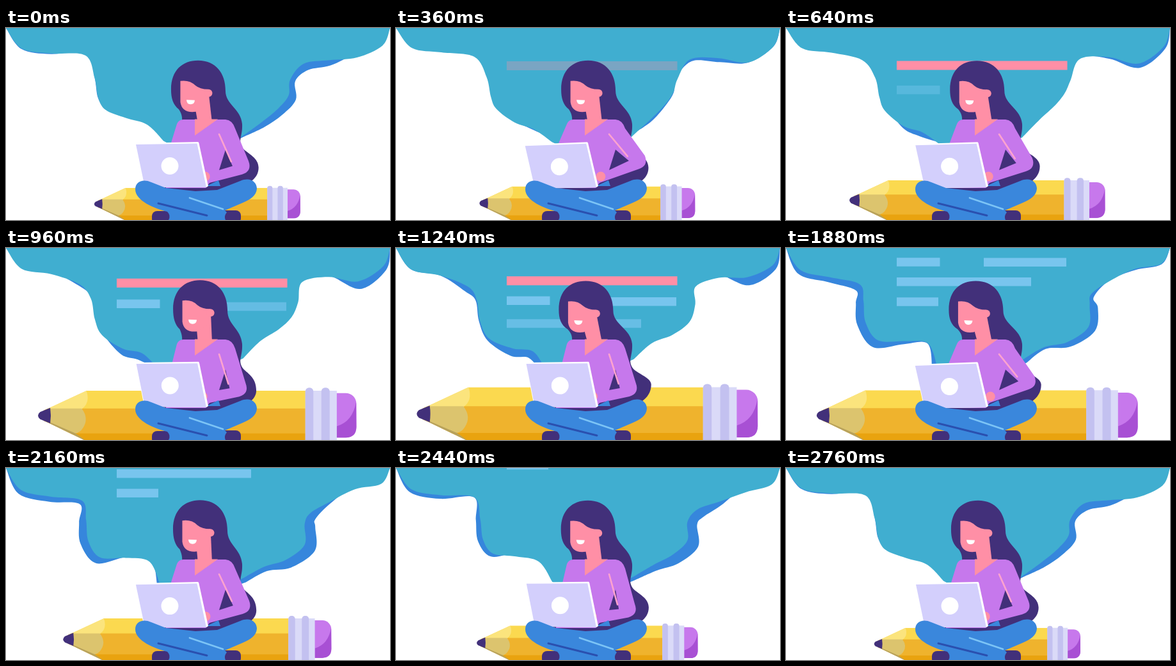
An HTML page with a canvas that plays this animation: 600x300 px, repeating every 2.8 s.

```html
<!DOCTYPE html>
<html lang="en">
<head>
<meta charset="utf-8">
<title>Writing on a pencil</title>
<style>
html, body { margin: 0; width: 100%; height: 100%; overflow: hidden; background: #fff; }
canvas { display: block; width: 600px; height: 300px; }
</style>
</head>
<body>
<canvas id="stage" width="600" height="300"></canvas>
<script>
const ctx = document.getElementById('stage').getContext('2d');
const LOOP = 2800, STEP = 40, CYCLE = LOOP - STEP;
const TEAL = '#40aed0', BLUE = '#3686dc', HAIR = '#42307a', SKIN = '#ff8fa6',
  SWEATER = '#c678ec', SKY = '#78c5ee', DENIM = '#3a87dc';

// Resting cloud edge, top to bottom: x, y, swing in px, phase in degrees.
const leftEdge = [
  [24, 33, 2, 235], [70, 42, 4, 235], [118, 52, 11, 185], [131, 80, 11, 225],
  [136, 112, 13, 228], [150, 136, 12, 215], [185, 148, 10, 140], [218, 155, 11, 115],
  [239, 182, 9, 180]
];
const rightEdge = [
  [588, 27, 3, 80], [548, 44, 12, 80], [505, 49, 4, 290], [468, 60, 15, 250],
  [458, 85, 19, 220], [453, 112, 23, 235], [430, 133, 17, 240], [400, 149, 7, 255],
  [370, 172, 3, 200]
];

const clamp = v => Math.max(0, Math.min(1, v));

// Cosine with whole turns per cycle, peaking at the given phase.
const wave = (t, phase, turns = 1) => Math.cos(2 * Math.PI * (turns * t / CYCLE - phase / 360));

function fill(color, d) {
  ctx.fillStyle = color;
  ctx.fill(new Path2D(d));
}

function line(color, width, d) {
  ctx.strokeStyle = color;
  ctx.lineWidth = width;
  ctx.lineCap = 'round';
  ctx.stroke(new Path2D(d));
}

function dot(color, x, y, r) {
  ctx.fillStyle = color;
  ctx.beginPath();
  ctx.arc(x, y, r, 0, Math.PI * 2);
  ctx.fill();
}

function box(color, x, y, w, h, r = 0) {
  ctx.fillStyle = color;
  ctx.beginPath();
  ctx.roundRect(x, y, w, h, r);
  ctx.fill();
}

// Each knot swings along its normal; the back layer follows later and further out.
function ripple(knots, corner, side, lag, t) {
  const moved = knots.map(([x, y, swing, phase], i) => {
    const a = knots[i - 1] || corner, b = knots[i + 1] || knots[i];
    const dx = b[0] - a[0], dy = b[1] - a[1], len = Math.hypot(dx, dy);
    let out = swing * wave(t, phase);
    if (lag) out += (4 + 0.4 * swing) * (0.3 + 1.2 * wave(t, phase + lag));
    return [x - side * out * dy / len, y + side * out * dx / len];
  });
  return [corner, ...moved];
}

function smooth(pts) {
  for (let i = 0; i < pts.length - 1; i++) {
    const b = pts[i], c = pts[i + 1], a = pts[i - 1] || b, d = pts[i + 2] || c;
    ctx.bezierCurveTo(b[0] + (c[0] - a[0]) / 6, b[1] + (c[1] - a[1]) / 6,
      c[0] - (d[0] - b[0]) / 6, c[1] - (d[1] - b[1]) / 6, c[0], c[1]);
  }
}

function cloud(color, t, leftLag, rightLag) {
  const right = ripple(rightEdge, [600, 0], -1, rightLag, t).reverse();
  ctx.fillStyle = color;
  ctx.beginPath();
  ctx.moveTo(0, 0);
  smooth(ripple(leftEdge, [0, 0], 1, leftLag, t));
  ctx.lineTo(300, 205);
  ctx.lineTo(...right[0]);
  smooth(right);
  ctx.fill();
}

// The page drifts up slowly, then scrolls at a steady speed.
function scroll(t) {
  const drift = 0.012 * Math.max(0, t - 600);
  return 52 - drift - 0.143 * 60 * Math.log(1 + Math.exp((t - 1520) / 60));
}

function page(t) {
  const y = scroll(t);
  ctx.globalAlpha = clamp((t - 300) / 200);
  box(SKIN, 173, y, 266.5, 14);
  [[1, 173, 67.5], [1, 309, 129], [2, 173, 210], [3, 173, 65]].forEach(([row, x, w], i) => {
    const age = t - 560 - 270 * i;
    if (age <= 0) return;
    ctx.globalAlpha = clamp(age / 200);
    box(SKY, x, y + row * 30 + 11 * Math.exp(-age / 300), w, 13.5);
  });
  ctx.globalAlpha = 1;
}

// Grows for half the loop and shrinks back, eased at both ends.
function pencilScale(t) {
  const u = Math.abs(((t - 30 + LOOP) % LOOP) / (LOOP / 2) - 1);
  return 0.6 + 0.4 * (1 - u) ** 2.2 / ((1 - u) ** 2.2 + u ** 2.2);
}

function pencil(t) {
  const s = pencilScale(t);
  ctx.save();
  ctx.translate(299, 299);
  ctx.scale(s, s);
  ctx.translate(-299, -299);
  ctx.save();
  ctx.clip(new Path2D('M20 259L50 246L112 217H570V310H120L112 302L50 272Z'));
  fill('#fbd94f', 'M40 217H482V248H40Z');
  fill('#efb32d', 'M40 247H482V290H40Z');
  fill('#e9a30f', 'M40 289H482V310H40Z');
  fill('#fbe47d', 'M40 249L112 217Q119 238 104 248Z');
  fill('#dcc46e', 'M40 247H104Q117 264 106 280Q101 288 92 289H40Z');
  fill('#b8a25c', 'M50 270L94 289L112 302H50Z');
  ctx.restore();
  fill(HAIR, 'M51 246L34 253Q27 259 34 265L51 272Q53 259 51 246Z');
  box('#c778ec', 520, 221, 47, 75, [0, 18, 18, 0]);
  fill('#a850d4', 'M566.5 236Q561 269 534 277V296H549Q567 296 567 278Z');
  box('#dadaf8', 481, 217, 53, 90);
  box('#c3c1f0', 481, 212, 13.5, 95, 6);
  box('#c3c1f0', 508, 212, 14, 95, 6);
  ctx.restore();
}

function hairBack(h) {
  const q = 390 - h * 1.15, y = 224 + h * 1.4, v = -h * 0.2;
  fill(HAIR, `M${262 + h} ${95 + v}C${262 + h} 66 ${280 + h} ${50 + v} ${304 + h} ${50 + v}
    C${332 + h} ${50 + v} ${347 + h} ${70 + v} ${347 + h} 98C${347 + h} 120 367 126 369 150
    C370 170 361 176 371 189C379 197 ${q} 203 ${q} ${y}C${q} 238 374 246 356 253
    H300L275 150C276 138 274 133 ${272 + h / 2} 127C${265 + h} 120 ${262 + h} 110 ${262 + h} ${95 + v}Z`);
}

function body(h, typing) {
  const ex = 384 + 8 * typing, ey = 222 - 6.5 * typing;
  fill(SKIN, `M${298 + h} 115L${321 + h} 104L322 148L300 150Z`);
  fill(SWEATER, `M277 143H343Q354 144 358 157L${ex - 3} ${ey - 16}Q${ex + 3} ${ey}
    ${ex - 13} ${ey + 5}L318 242L312 250H250L${257 - 3 * typing} 180L267 150Q270 143 277 143Z`);
  fill(SKIN, 'M295 142.5V168L331 142.5Z');
  fill(HAIR, `M333 222L343 190L${ex - 28} ${ey - 8}Z`);
  line('#ffa3cf', 2.6, `M333 166L${ex - 30} ${ey - 15}`);
  dot(SKIN, 313 + 7 * typing, 232, 7.5);
}

function face(h) {
  ctx.save();
  ctx.translate(h, -h * 0.2);
  fill(SKIN, 'M276.5 82Q291 80 300 89Q307 95 320 95L321 118L301 130Q279 133 276.5 115Z');
  dot(SKIN, 320.5, 101, 6);
  fill('#fff', 'M286 111.5L299 112Q298.5 118.5 292.5 118.5Q286.5 118.5 286 111.5Z');
  ctx.restore();
}

function laptop(typing) {
  ctx.save();
  ctx.translate(315, 248);
  ctx.rotate(-0.004 - 0.016 * typing);
  ctx.translate(-315, -248);
  fill('#fff', 'M202 180L300 178Q301 178 301.5 180L316 247L313 249L216 249Z');
  fill('#d3cffc', 'M203 182L298.5 180.5L313 249H217Z');
  dot('#fff', 256, 215.5, 13.5);
  ctx.restore();
}

function legs() {
  box(HAIR, 228, 286, 38, 20, 8);
  box(HAIR, 332, 285, 35, 20, 8);
  fill(DENIM, `M202 252C202 240 214 235 227 241L250 250L296 255L330 253L366 239
    C382 232 392 241 392 251C391 262 382 268 370 273L342 285L345 288Q340 294 343 300H254
    Q258 293 252 287C232 282 202 270 202 252Z`);
  line('#2a50b0', 3, 'M238 274L314 293');
  line('#7cc4f6', 2.8, 'M287 265.5L339 283');
}

function draw(t) {
  const head = -3.7 + 4 * wave(t, 95, 4), typing = wave(t, 105, 2);
  ctx.fillStyle = '#fff';
  ctx.fillRect(0, 0, 600, 300);
  cloud(BLUE, t, 30, 70);
  cloud(TEAL, t);
  page(t);
  pencil(t);
  hairBack(head);
  box(HAIR, 222, 245, 140, 12);
  body(head, typing);
  face(head);
  fill(DENIM, 'M313 247L332 238L335 247Z');
  laptop(typing);
  legs();
}

function tick(now) {
  draw(Math.floor((now % LOOP) / STEP) * STEP);
  requestAnimationFrame(tick);
}

draw(0);
requestAnimationFrame(tick);
</script>
</body>
</html>
```
